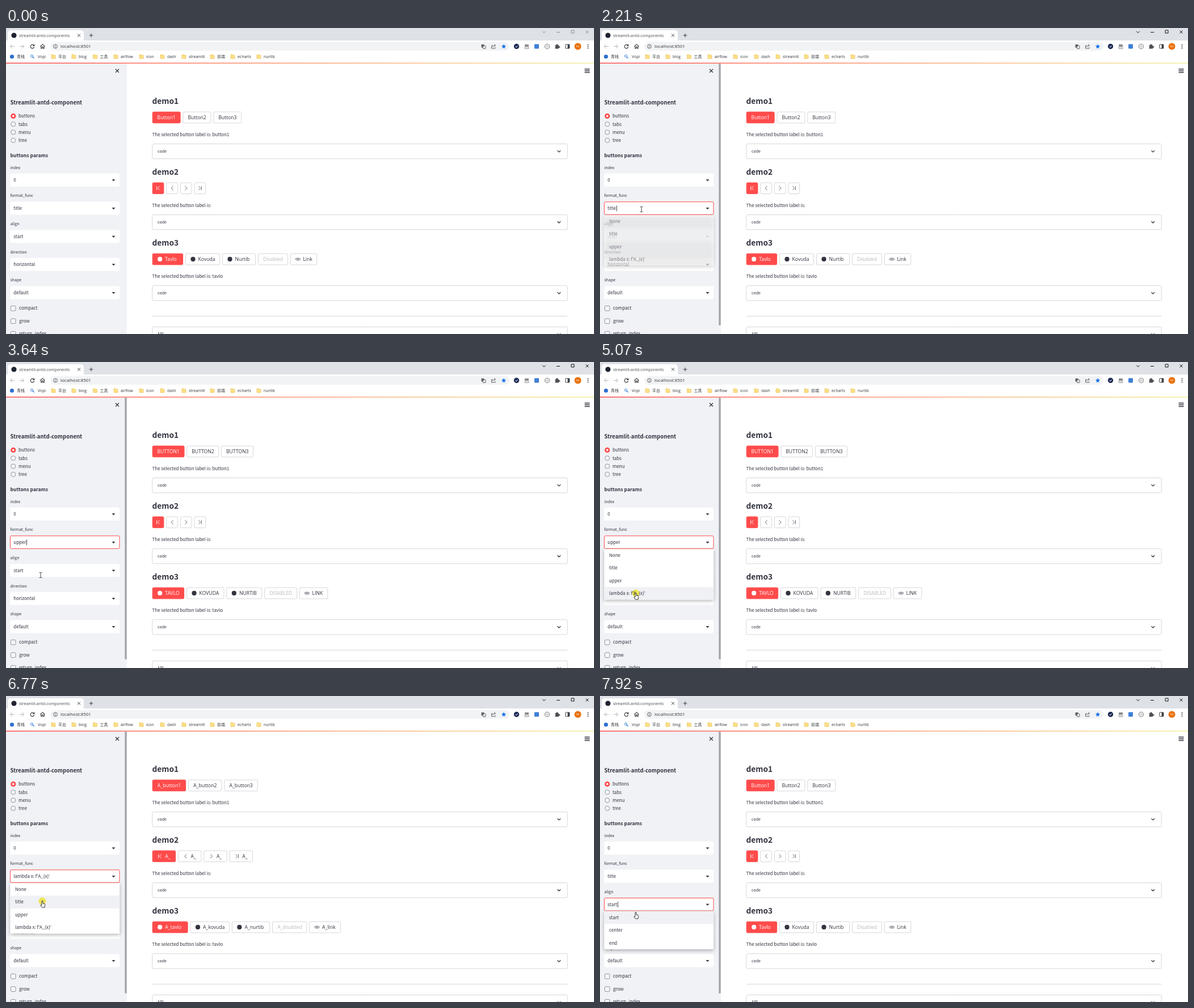
Write an HTML page with a canvas that moves like this. It is 1036 by 540 pixels and loops after 7990 ms.

```html
<!DOCTYPE html>
<html lang="en">
<head>
<meta charset="utf-8">
<title>Buttons demo</title>
<style>
html, body { margin: 0; width: 100%; height: 100%; overflow: hidden; background: #fff; }
canvas { display: block; }
</style>
</head>
<body>
<canvas id="stage" width="1036" height="540"></canvas>
<script>
const ctx = document.getElementById('stage').getContext('2d');
const LOOP = 7990;
const PAGE = '"Noto Sans CJK SC", "Noto Sans CJK JP", "Noto Sans CJK", sans-serif';
const UI = '"Open Sans", "Noto Sans", "Noto Sans CJK SC", sans-serif';
const INK = '#31333f', RED = '#ff4b4b', LINE = '#d6d7da', GREY = '#5f6368', BLUE = '#1a73e8';

// ---------- helpers ----------
function text(s, x, mid, size, color = INK, font = PAGE, weight = 400, align = 'left') {
  ctx.font = `${weight} ${size}px ${font}`;
  ctx.textAlign = align;
  ctx.fillStyle = color;
  ctx.fillText(s, x, mid + size * 0.36);
}
function box(x, y, w, h, r, fill, line) {
  ctx.beginPath();
  ctx.roundRect(x, y, w, h, r);
  if (fill) { ctx.fillStyle = fill; ctx.fill(); }
  if (line) { ctx.strokeStyle = line; ctx.lineWidth = 1; ctx.stroke(); }
}
function disc(x, y, r, fill, line) { box(x - r, y - r, 2 * r, 2 * r, r, fill, line); }
function icon(d, x, y, color = INK, width = 1, fill) {
  const path = new Path2D(d);
  ctx.save();
  ctx.translate(x, y);
  if (fill) { ctx.fillStyle = fill; ctx.fill(path); }
  if (width) { ctx.strokeStyle = color; ctx.lineWidth = width; ctx.stroke(path); }
  ctx.restore();
}
// latest entry of [[time, value], ...] at time t
const at = (steps, t) => steps.filter(s => s[0] <= t).pop()[1];
const clamp = v => Math.max(0, Math.min(1, v));

const CROSS = 'M-2.5-2.5L2.5 2.5M2.5-2.5L-2.5 2.5';
const DOWN = 'M-2.8-1.4L0 1.4L2.8-1.4';

// ---------- timeline ----------
const LAMBDA = "lambda x: f'A_{x}'";
const FUNCS = ['None', 'title', 'upper', LAMBDA];
const ALIGNS = ['start', 'center', 'end'];
const chosen = [[0, 'title'], [3160, 'upper'], [5120, LAMBDA], [6840, 'title']];
const applied = [[0, 'title'], [3370, 'upper'], [5330, LAMBDA], [6980, 'title']];
const opened = [[0, ''], [2070, 'format'], [3160, ''], [4340, 'format'], [5120, ''],
  [5890, 'format'], [6840, ''], [7570, 'align']];
const presses = [2070, 2900, 4340, 5000, 5890, 6700, 7570];
const pointer = [
  [190, 1036, 520], [520, 101, 388], [780, 101, 388], [1060, 104, 322], [1250, 104, 322],
  [1530, 88, 309], [1810, 73, 320], [2340, 73, 320], [2820, 60, 385], [3370, 60, 385],
  [3640, 61, 376], [4050, 73, 336], [4120, 73, 336], [4190, 73, 322], [4500, 73, 322],
  [5000, 63, 408], [5190, 63, 408], [5550, 70, 323.5], [5680, 70, 322], [6050, 70, 322],
  [6630, 64, 362], [6840, 64, 362], [7370, 64, 370], [7640, 64, 370], [7920, 63, 382]
];
function pointerAt(t) {
  const i = pointer.findIndex(p => p[0] > t);
  if (i < 0) return pointer[pointer.length - 1].slice(1);
  const [t0, x0, y0] = pointer[i - 1], [t1, x1, y1] = pointer[i];
  const k = (t - t0) / (t1 - t0), e = k * k * (3 - 2 * k);
  return [x0 + (x1 - x0) * e, y0 + (y1 - y0) * e];
}
const format = (name, func) =>
  func === 'upper' ? name.toUpperCase() :
  func === LAMBDA ? 'A_' + name :
  name && name[0].toUpperCase() + name.slice(1);

// ---------- browser frame ----------
function browser(active) {
  ctx.fillStyle = '#dee1e6';
  ctx.fillRect(0, 0, 1036, 23);
  box(3, 4, 134, 20, [5, 5, 0, 0], '#fff');
  disc(14, 13, 4.6, '#1f2430');
  text('streamlit-antd-components', 23, 13, 7, '#45484d', UI);
  icon(CROSS, 128.5, 13, '#3c4043', 1);
  icon('M-3.3 0H3.3M0-3.3V3.3', 150, 13, '#3c4043', 1.1);
  const ctl = active ? '#111' : '#8b8e93';
  icon('M-2.8-1.2L0 1.6L2.8-1.2', 948, 7, ctl);
  icon('M-3 0H3', 973, 7.5, ctl);
  icon('M-2.5-2.5H2.5V2.5H-2.5Z', 998.5, 6.5, ctl);
  icon(CROSS, 1024, 7, ctl);

  ctx.fillStyle = '#fff';
  ctx.fillRect(0, 22, 1036, 40);
  icon('M4 0H-3.5M0-3.5L-3.5 0L0 3.5', 11, 32.5, '#b4b7bb');
  icon('M-4 0H3.5M0-3.5L3.5 0L0 3.5', 28, 32.5, '#b4b7bb');
  icon('M2.8-1.7A3.3 3.3 0 1 0 3.2 1M3.3-3.8V-1H.5', 46.5, 32.5, '#3c4043', 1.2);
  icon('M-4 0L0-3.8L4 0M-2.8-.7V3.4H-.9V.8H.9V3.4H2.8V-.7', 64.5, 32.5, '#3c4043', 1.1);
  box(78, 25, 809, 15, 7.5, '#f1f3f4');
  disc(87, 32.5, 3.4, null, GREY);
  icon('M0-.5V2M0-2V-1', 87, 32.5, GREY);
  text('localhost:8501', 96, 32.5, 8, '#33363a', UI);
  box(837.5, 29, 5, 5.5, 0.5, GREY);
  box(840.5, 31.5, 4.5, 5, 0.5, '#f1f3f4', GREY);
  icon('M-1-1.5H-3.5V3.5H3V1.5M-1.5 1.5C-1-.8.5-1.8 3-1.8M1.3-3.8L3.5-1.8L1.3 0', 859, 32.5, GREY);
  icon('M0-4.3L1.2-1.4L4.2-1.2L1.9.8L2.6 3.8L0 2.2L-2.6 3.8L-1.9.8L-4.2-1.2L-1.2-1.4Z', 877, 32.5, BLUE, 0, BLUE);
  disc(899.5, 32.5, 4.7, '#1d2b55');
  icon('M-2 0L-.5 1.6L2.2-1.5', 899.5, 32.5, '#fff');
  box(914, 29, 7, 3.5, 0.5, '#85888c');
  box(914, 33.5, 7, 3, 0.5, null, '#85888c');
  box(931, 28.5, 8, 8, 1, '#3d7fd6');
  disc(953.5, 32.5, 4.2, null, '#777');
  icon('M-.9-2Q-2.2 0-.9 2M.9-2Q2.2 0 .9 2', 953.5, 32.5, '#777', 0.8);
  icon('M-3.5-2.2H-1.3A1.4 1.4 0 1 1 1.2-2.2H3V0A1.4 1.4 0 1 1 3 2V4H-3.5V1.8A1.2 1.2 0 0 0-3.5-.4Z', 971, 32.5, INK, 0, '#4b4e53');
  box(985.8, 29, 7, 7, 0.5, null, '#3c4043');
  ctx.fillStyle = '#3c4043';
  ctx.fillRect(989.5, 29, 3.5, 7);
  disc(1007.5, 32.5, 6, '#e8710a');
  text('lo', 1007.5, 32.2, 6, '#fff', UI, 400, 'center');
  for (const dy of [-3, 0, 3]) disc(1025.5, 32.5 + dy, 0.9, '#3c4043');

  disc(10.5, 50.5, 3.6, '#2f6fd0');
  text('青栈', 19, 50.5, 7, '#33363a', UI);
  disc(45.5, 49.5, 2, null, '#2b78d4');
  icon('M0 0L2.5 2.5', 47, 51, '#2b78d4', 1.2);
  text('Vopi', 56, 50.5, 6.9, '#33363a', UI);
  const marks = { 平台: 92, blog: 128, 工具: 165.5, airflow: 202, icon: 247, dash: 284,
    streamlit: 322, 前端: 372, echarts: 408, nurtib: 454 };
  for (const [name, x] of Object.entries(marks)) {
    icon('M-3.5-3.5H-.5L.5-2.5H3.5V3.5H-3.5Z', x - 8.5, 50.5, '#eac35a', 0.7, '#fbdf86');
    text(name, x, 50.5, 6.9, '#33363a', UI);
  }
}

// ---------- sidebar ----------
function select(label, value, mid, focused, caret) {
  text(label, 7.5, mid - 22.5, 7);
  box(7.5, mid - 11.5, 192.5, 22.5, 2, '#fff', focused ? RED : '#fbfbfc');
  text(value, 13.3, mid, 8);
  if (caret) {
    const x = 13.8 + ctx.measureText(value).width;
    ctx.fillStyle = INK;
    ctx.fillRect(Math.round(x), mid - 5, 0.9, 10);
  }
  icon('M-3-1.5H3L0 1.7Z', 189.5, mid + 0.3, INK, 0, INK);
}
function sidebar(t, focus, caret) {
  ctx.fillStyle = '#f0f2f6';
  ctx.fillRect(0, 62, 213, 478);
  icon('M-3-3L3 3M3-3L-3 3', 196, 75.5, INK, 1.2);
  text('Streamlit-antd-component', 7.5, 132, 9.58, INK, PAGE, 600);
  ['buttons', 'tabs', 'menu', 'tree'].forEach((name, i) => {
    const y = 155.4 + i * 14.3;
    if (i) disc(12.8, y, 4, '#f6f7f9', '#8f929b');
    else { disc(12.8, y, 4.6, RED); disc(12.8, y, 1.8, '#fff'); }
    text(name, 22, y, 8);
  });
  text('buttons params', 7.5, 224.5, 8.6, INK, PAGE, 600);
  select('index', '0', 268.5);
  select('format_func', at(chosen, t), 318.3, focus === 'format', focus === 'format' && caret);
  select('align', 'start', 368, focus === 'align', focus === 'align' && caret);
  select('direction', 'horizontal', 417.5);
  select('shape', 'default', 467.2);
  ['compact', 'grow', 'return_index'].forEach((name, i) => {
    const y = 494.5 + i * 22.5;
    box(8.5, y - 4, 8.5, 8.5, 1.2, '#f6f7f9', '#8f929b');
    text(name, 23, y, 8);
  });
  if (t >= 450) box(209.3, 62.5, 3.4, 462.5, 1.7, '#a3a5ad');
}
const ROW = 22.4;
function dropdown(items, top, hover, alpha) {
  ctx.save();
  ctx.globalAlpha = alpha;
  ctx.shadowColor = 'rgba(0,0,0,.3)';
  ctx.shadowBlur = 6;
  ctx.shadowOffsetY = 2;
  box(7.3, top, 193, ROW * items.length, [0, 0, 2, 2], '#fff');
  ctx.shadowColor = 'transparent';
  items.forEach((name, i) => {
    const y = top + i * ROW;
    if (i === hover) { ctx.fillStyle = '#f0f1f4'; ctx.fillRect(7.3, y, 193, ROW); }
    text(name, 16, y + ROW / 2, 8);
  });
  ctx.restore();
}

// ---------- main area ----------
const SIGNS = {
  first: 'M-2.5-3.5V3.5M2.5-3.5L-.8 0L2.5 3.5',
  prev: 'M2-3.5L-1.8 0L2 3.5',
  next: 'M-2-3.5L1.8 0L-2 3.5',
  last: 'M2.5-3.5V3.5M-2.5-3.5L.8 0L-2.5 3.5',
  link: 'M.2-1.6H-2.4A1.6 1.6 0 0 0-2.4 1.6H.2M-.2-1.6H2.4A1.6 1.6 0 0 1 2.4 1.6H-.2M-1.8 0H1.8'
};
function buttons(names, widths, signs, y, func) {
  let x = 258;
  names.forEach((name, i) => {
    const w = widths[i], sign = signs[i], label = format(name, func), mid = y + 10;
    const color = i === 0 ? '#fff' : name === 'disabled' ? '#b9babd' : INK;
    box(x + 0.2, y + 0.3, w - 0.6, 19.6, 2, i ? '#fff' : RED, i ? LINE : RED);
    if (sign) {
      const cx = label ? x + 13.2 : x + w / 2;
      if (sign === 'dot') disc(cx, mid, 4.1, color);
      else icon(SIGNS[sign], cx, mid, i ? '#5a5c68' : '#fff', 0.9);
      text(label, x + 22.3, mid, 8.6, color, UI);
    } else text(label, x + w / 2, mid, 8.6, color, UI, 400, 'center');
    x += w + 4.3;
  });
}
function expander(label, y) {
  box(257.8, y + 0.5, 731.4, 26.3, 2, '#fff', LINE);
  text(label, 267, y + 13.7, 7);
  icon(DOWN, 974.3, y + 13.5, INK, 1.3);
}
function main(func) {
  const triple = { title: 49.5, upper: 56.4, [LAMBDA]: 59 }[func];
  const wide = {
    title: [54, 60.7, 58.6, 52.6, 47],
    upper: [56, 66, 62.5, 57.5, 50],
    [LAMBDA]: [62.5, 69, 67, 61, 55]
  }[func];
  const small = func === LAMBDA ? 41 : 20.3;
  icon('M-4.5-3H4.5M-4.5 0H4.5M-4.5 3H4.5', 1024, 75.5, INK, 1.3);
  ['button1', '', 'tavlo'].forEach((picked, i) => {
    const y = 129 + i * 125.1;
    text('demo' + (i + 1), 257.5, y, 13.7, INK, PAGE, 600);
    text('The selected button label is: ' + picked, 257.5, y + 59, 8);
    expander('code', y + 75);
  });
  buttons(['button1', 'button2', 'button3'], Array(3).fill(triple), [], 147.8, func);
  buttons(['', '', '', ''], Array(4).fill(small), ['first', 'prev', 'next', 'last'], 272.7, func);
  buttons(['tavlo', 'kovuda', 'nurtib', 'disabled', 'link'], wide, ['dot', 'dot', 'dot', '', 'link'], 397.9, func);
  ctx.fillStyle = LINE;
  ctx.fillRect(258, 508, 731, 1);
  expander('API', 527);
}

// ---------- pointer ----------
function drawPointer(t, x, y, top, rows) {
  if (presses.some(p => t >= p && t < p + 135)) {
    ctx.globalCompositeOperation = 'multiply';
    disc(x, y, 6.5, '#fbf25a');
    ctx.globalCompositeOperation = 'source-over';
  }
  const inList = rows && y >= top && y < top + rows * ROW;
  const inField = x < 200 && [268.5, 318.3, 368, 417.5, 467.2].some(m => Math.abs(y - m) < 11.5);
  if (inList) {
    icon('M-1 0Q0-1.2 1 0V4L4 4.7Q5 5 4.8 6.5L4 11H-.5L-3.2 7.3Q-3.3 6-1 7.2Z', x, y, '#222', 0.9, '#fff');
  } else if (inField) {
    icon('M-2.5-4.5H-.6L0-4L.6-4.5H2.5M0-4V4M-2.5 4.5H-.6L0 4L.6 4.5H2.5', x, y, '#333', 0.9);
  } else {
    icon('M0 0V9.5L2.2 7.5L3.8 11L5.2 10.3L3.7 7H6.7Z', x, y, '#222', 0.8, '#fff');
  }
}

function draw() {
  const t = performance.now() % LOOP;
  const open = at(opened, t);
  const focus = t >= 7570 ? 'align' : t >= 2070 ? 'format' : '';
  const [since] = opened.filter(s => s[0] <= t).pop();
  const caret = Math.floor((t - since) / 530) % 2 === 0;

  ctx.fillStyle = '#fff';
  ctx.fillRect(0, 0, 1036, 540);
  main(at(applied, t));
  sidebar(t, focus, caret);
  browser(t >= 2070);
  const band = ctx.createLinearGradient(0, 0, 1036, 0);
  band.addColorStop(0, RED);
  band.addColorStop(1, '#f3f0a0');
  ctx.fillStyle = band;
  ctx.fillRect(0, 61.2, 1036, 1.5);

  const items = open === 'format' ? FUNCS : open ? ALIGNS : [];
  const top = open === 'align' ? 379.8 : 330;
  const pos = t >= 190 ? pointerAt(t) : null;
  if (open) {
    const row = Math.floor((pos[1] - top) / ROW);
    const current = open === 'format' ? items.indexOf(at(chosen, t)) : 0;
    dropdown(items, top, row >= 0 ? row : current, clamp((t - since - 40) / 170));
  }
  if (pos) drawPointer(t, pos[0], pos[1], top, items.length);
  requestAnimationFrame(draw);
}
draw();
</script>
</body>
</html>
```
